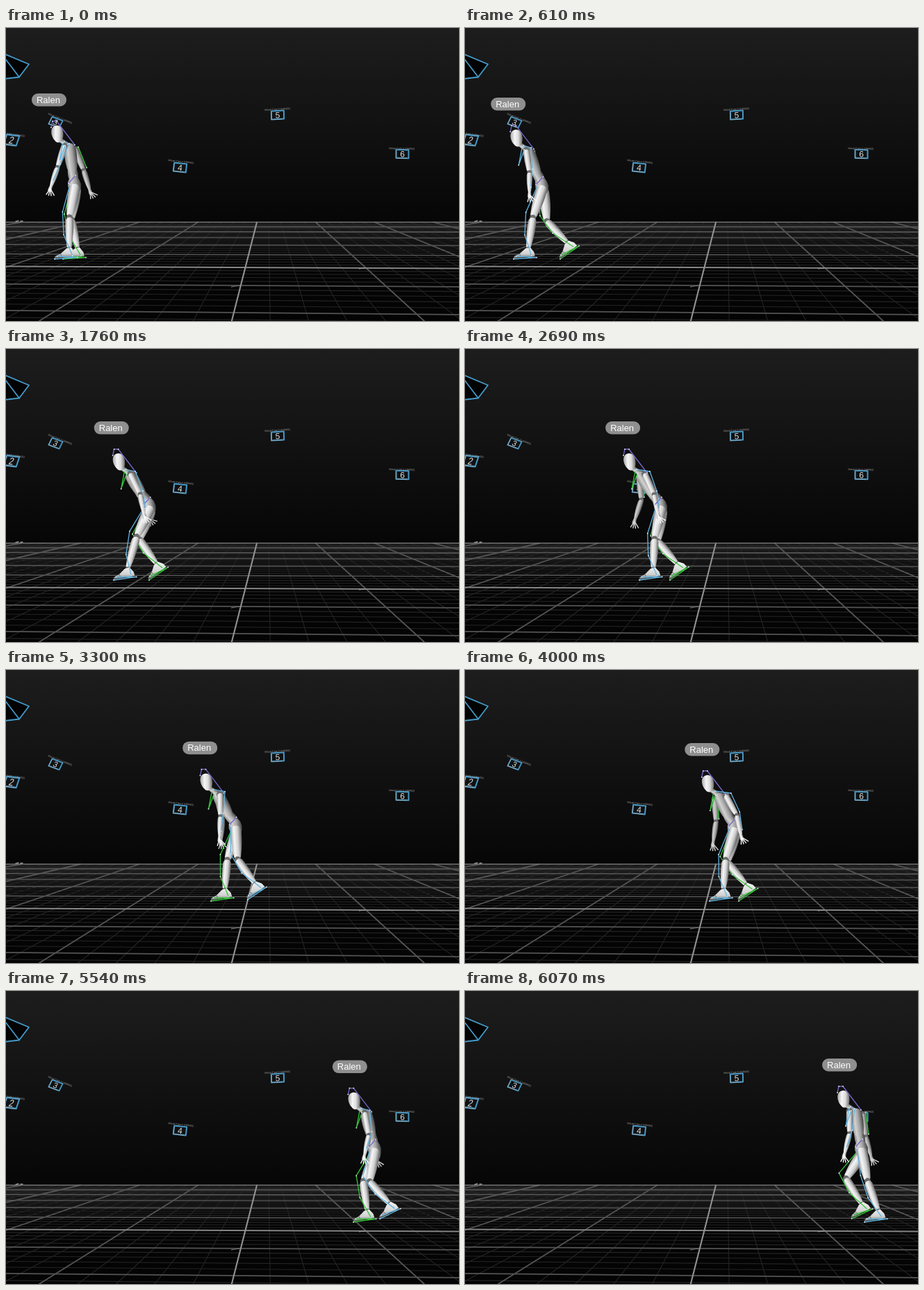
Animation of 652x421 px, one loop 6.15 s. Source, as an HTML page with a canvas:

```html
<!DOCTYPE html>
<html lang="en">
<head>
<meta charset="utf-8">
<title>Motion capture walk</title>
<style>
html, body { margin: 0; width: 100%; height: 100%; overflow: hidden; background: #000; }
canvas { display: block; }
</style>
</head>
<body>
<canvas id="stage" width="652" height="421"></canvas>
<script>
const W = 652, H = 421, LOOP = 6150, FRAMES = 80, STEP = LOOP / FRAMES;
const HORIZON = 279, GROUND = 332;
const BLUE = '#62b4e0', GREEN = '#35c63a', PURPLE = '#7768c8';
const FONT = '"Liberation Sans", Arial, sans-serif';
const ctx = document.getElementById('stage').getContext('2d');

// time, hip x/y, head x/y, shoulder spread, near upper/fore arm, far upper/fore arm (degrees)
const POSES = [
  [0, 98, 227, 74, 152, 16, -18, -19, 22, 17],
  [610, 110, 229, 74, 158, 8, 8, 0, 14, 6],
  [1760, 205, 228, 162, 162, 3, 26, 11, 20, 25],
  [2690, 281, 228, 237, 162, -8, 24, 12, 5, -18],
  [4000, 387, 229, 350, 163, -16, 29, 12, 3, -8],
  [5000, 487, 229, 455, 160, -6, 20, -9, 12, 5],
  [6070, 570, 228, 545, 155, 19, 0, -14, 8, 15]
];

// Each step: lift-off time, toe contact time, new toe x
const NEAR_FOOT = { start: 70, steps: [[750, 1220, 155], [1850, 2330, 251],
  [2850, 3370, 352], [4080, 4620, 460], [5180, 5750, 575]] };
const FAR_FOOT = { start: 82, steps: [[60, 600, 137], [1280, 1740, 206],
  [2380, 2680, 295], [3450, 3960, 394], [4660, 4960, 500], [5850, 6230, 590]] };

// digit, center, box axes, start of the tag and its slope
const CAMERAS = [
  ['2', 8, 161, 19, 2.5, -5, 15, -10, 151, .15],
  ['3', 71.5, 135.5, 16, 6, -5.5, 11, 60, 124, .4],
  ['4', 250.5, 200.5, 19, 2, -1.5, 13, 233, 191, .11],
  ['5', 391, 125, 19, -1, .3, 13, 372, 119, -.06],
  ['6', 570.5, 181, 19, .3, 0, 13, 551, 174, .02]
];

const add = (p, x, y) => ({ x: p.x + x, y: p.y + y });
const mix = (a, b, u) => ({ x: a.x + (b.x - a.x) * u, y: a.y + (b.y - a.y) * u });
const clamp = u => Math.max(0, Math.min(1, u));
const smooth = u => u * u * (3 - 2 * u);
const polar = (p, degrees, length) => {
  const a = degrees * Math.PI / 180;
  return add(p, Math.sin(a) * length, Math.cos(a) * length);
};

function trace(points) {
  ctx.beginPath();
  for (const p of points) ctx.lineTo(p.x, p.y);
}

function stroke(points, color, width) {
  trace(points);
  ctx.strokeStyle = color;
  ctx.lineWidth = width;
  ctx.stroke();
}

function fill(points, color) {
  trace(points);
  ctx.fillStyle = color;
  ctx.fill();
}

function markers(points, color) {
  stroke(points, color, 1.3);
  ctx.fillStyle = '#dfe8f2';
  for (const p of points) ctx.fillRect(p.x - .8, p.y - .8, 1.6, 1.6);
}

// ---------- scene ----------
function drawFloor() {
  ctx.save();
  ctx.beginPath();
  ctx.rect(0, HORIZON - 1, W, H);
  ctx.clip();
  ctx.fillStyle = '#040404';
  ctx.fillRect(0, HORIZON, W, H);

  const vanishY = 216.5;
  const acrossX = (k, y) => 377 + (y - vanishY) * (-.255 + 1.355 * k);
  const column = (k, color, width) =>
    stroke([HORIZON, H].map(y => ({ x: acrossX(k, y), y })), color, width);
  const row = (k, color, width) => {
    const y = vanishY + 1 / (.00784 + .00132 * k);
    const tilt = (y - HORIZON) * .023;
    stroke([{ x: 0, y: y - tilt }, { x: W, y: y + tilt }], color, width);
  };

  for (let i = -35; i <= 35; i++) if (i % 5) column(i / 5, '#242424', 1.1);
  for (let i = -12; i < 30; i++) if (i % 5) row(i / 5, '#242424', 1.1);
  for (let k = -7; k <= 7; k++) if (k) column(k, '#545454', 1.8);
  for (let k = -2; k < 6; k++) if (k) row(k, '#545454', 1.7);
  row(0, '#858585', 2);
  column(0, '#929292', 2.1);
  stroke([{ x: 0, y: HORIZON }, { x: W, y: HORIZON }], '#767676', 1.5);
  stroke([{ x: 324, y: 372 }, { x: 336, y: 370 }], '#777', 1);
  stroke([{ x: 508, y: 346 }, { x: 517, y: 345 }], '#999', 1);
  ctx.restore();
  stroke([{ x: 14, y: 278 }, { x: 18, y: 277 }], '#999', 1.3);
  stroke([{ x: 21, y: 277.5 }, { x: 24, y: 277.5 }], '#999', 1.3);
}

function drawCamera([digit, x, y, ax, ay, bx, by, tagX, tagY, slope]) {
  ctx.save();
  ctx.transform(ax / 19, ay / 19, bx / 13, by / 13, x, y);
  ctx.fillStyle = '#101214';
  ctx.fillRect(-9, -6, 18, 12);
  ctx.strokeStyle = '#4798c6';
  ctx.lineWidth = 2;
  ctx.strokeRect(-9, -6, 18, 12);
  stroke([{ x: -9, y: -4 }, { x: -9, y: 6 }, { x: 6, y: 6 }], '#86a2b0', 1.1);
  ctx.fillStyle = '#e0e0e0';
  ctx.font = '12px ' + FONT;
  ctx.textAlign = 'center';
  ctx.fillText(digit, 0, 4.3);
  ctx.restore();

  ctx.save();
  ctx.translate(tagX, tagY);
  ctx.rotate(Math.atan(slope));
  ctx.fillStyle = '#a8a8a8';
  ctx.font = '3.6px ' + FONT;
  ctx.fillText(`Virtual Cam ${digit} (168402)`, 0, 0);
  ctx.restore();
}

function drawScene() {
  const sky = ctx.createLinearGradient(0, 0, 0, HORIZON);
  sky.addColorStop(0, '#1d1d1d');
  sky.addColorStop(1, '#060606');
  ctx.fillStyle = sky;
  ctx.fillRect(0, 0, W, HORIZON);
  drawFloor();
  const cone = [{ x: -2, y: 37.5 }, { x: 33, y: 52 }, { x: 19, y: 70.5 }, { x: -2, y: 73 }];
  fill(cone, '#030303');
  stroke(cone, '#459ac8', 1.8);
  stroke([{ x: -2, y: 43 }, cone[2]], '#459ac8', 1.8);
  CAMERAS.forEach(drawCamera);
}

// ---------- motion ----------
function poseAt(t) {
  let i = 0;
  while (i < POSES.length - 2 && t >= POSES[i + 1][0]) i++;
  const a = POSES[i], b = POSES[i + 1];
  const before = POSES[Math.max(0, i - 1)], after = POSES[Math.min(POSES.length - 1, i + 2)];
  const span = b[0] - a[0], u = clamp((t - a[0]) / span);
  const [, hipX, hipY, headX, headY, spread, nearUpper, nearFore, farUpper, farFore] = a.map((v, c) => {
    const slopeA = (b[c] - before[c]) / (b[0] - before[0]) * span;
    const slopeB = (after[c] - v) / (after[0] - a[0]) * span;
    return v + (b[c] - v) * smooth(u) + slopeA * u * (1 - u) ** 2 - slopeB * u * u * (1 - u);
  });
  // The walking poses lie one stride apart; arms swing through in between.
  const swing = i >= 1 && i <= 4 ? Math.sin(Math.PI * u) ** 2 : 0;
  return {
    hip: { x: hipX, y: hipY - 2 * swing },
    head: { x: headX, y: headY - 2 * swing },
    spread: spread + 10 * swing,
    near: [nearUpper - 26 * swing, nearFore - 16 * swing],
    far: [farUpper + 10 * swing, farFore + 14 * swing]
  };
}

function footAt({ start, steps }, t) {
  let x = start, pitch = 4, lift = 0;
  for (const [from, to, target] of steps) {
    if (t < from) break;
    const u = clamp((t - from) / (to - from));
    const settle = clamp((t - to) / 260);
    x += (target - x) * smooth(u);
    lift = 5 * Math.sin(Math.PI * u);
    pitch = 8 + 27 * smooth(u) * (1 - smooth(settle));
  }
  const a = pitch * Math.PI / 180, c = Math.cos(a), s = Math.sin(a);
  const toe = { x, y: GROUND - lift };
  const at = (along, up) => add(toe, along * c - up * s, -along * s - up * c);
  return { at, toe, heel: at(33, 0), ankle: at(22, 13) };
}

function kneeFor(hip, ankle) {
  const thigh = 45, shin = 43;
  const dx = ankle.x - hip.x, dy = ankle.y - hip.y;
  const d = Math.min(Math.hypot(dx, dy), thigh + shin - .3);
  const bend = Math.acos((thigh * thigh + d * d - shin * shin) / (2 * thigh * d));
  const a = Math.atan2(dy, dx) + bend;
  return add(hip, Math.cos(a) * thigh, Math.sin(a) * thigh);
}

// ---------- mannequin ----------
const BRIGHT = ['#555', '#cfcfcf', '#f6f6f6', '#999'];
const SHADED = ['#3a3a3a', '#a0a0a0', '#d2d2d2', '#808080'];

function limb(a, b, r1, r2, tones = BRIGHT) {
  const length = Math.hypot(b.x - a.x, b.y - a.y);
  const r = Math.max(r1, r2) * 1.1;
  const shade = ctx.createLinearGradient(0, -r, 0, r);
  tones.forEach((color, i) => shade.addColorStop([0, .36, .68, 1][i], color));
  ctx.save();
  ctx.translate(a.x, a.y);
  ctx.rotate(Math.atan2(b.y - a.y, b.x - a.x));
  ctx.beginPath();
  ctx.arc(0, 0, r1, Math.PI / 2, -Math.PI / 2);
  ctx.quadraticCurveTo(length * .45, -r1 * 1.15, length, -r2);
  ctx.arc(length, 0, r2, -Math.PI / 2, Math.PI / 2);
  ctx.quadraticCurveTo(length * .45, r1 * 1.15, 0, r1);
  ctx.fillStyle = shade;
  ctx.fill();
  ctx.restore();
}

function joint(p, r) {
  ctx.beginPath();
  ctx.arc(p.x, p.y, r, 0, 7);
  ctx.fillStyle = '#6c6c6c';
  ctx.fill();
}

function drawArm(shoulder, [upper, fore], tones) {
  const elbow = polar(shoulder, upper, 32), wrist = polar(elbow, fore, 27);
  joint(shoulder, 5);
  limb(polar(shoulder, upper, 3), polar(shoulder, upper, 27), 4.6, 3.6, tones);
  joint(elbow, 3.4);
  limb(polar(elbow, fore, 4), wrist, 3.9, 2.2, tones);
  limb(polar(wrist, fore, 2), polar(wrist, fore, 7), 2.2, 2.8, tones);
  for (const angle of [-10, 4, 18, 34]) {
    stroke([polar(wrist, fore, 5), polar(wrist, fore + angle, 15)], tones[2], 1.4);
  }
  return { elbow, wrist };
}

function drawLeg(hip, foot, color) {
  const { ankle, at } = foot, knee = kneeFor(hip, ankle);
  limb(mix(hip, knee, .08), mix(hip, knee, .88), 7.6, 5.2);
  joint(knee, 4.6);
  limb(mix(knee, ankle, .12), mix(knee, ankle, .9), 5.8, 3.6);
  joint(ankle, 3.2);
  const shade = ctx.createLinearGradient(0, ankle.y - 4, 0, foot.toe.y);
  shade.addColorStop(0, '#f4f4f4');
  shade.addColorStop(.6, '#d0d0d0');
  shade.addColorStop(1, '#555');
  fill([at(0, 1), at(1, 4), at(9, 7), at(18, 14), at(25, 15), at(30, 8), at(31, 2)], shade);
  stroke([at(9, 7), at(11, 1)], '#666', 1);

  markers([add(hip, -7, -3), add(knee, -10, -8), add(mix(knee, ankle, .55), -8, 0), at(26, 3)], color);
  markers([foot.toe, foot.heel, at(4, 4)], color);
}

function drawHead(head, lean) {
  ctx.save();
  ctx.translate(head.x, head.y);
  ctx.rotate(-.08 - lean * .003);
  ctx.beginPath();
  ctx.moveTo(0, -12);
  ctx.bezierCurveTo(10, -12, 10, 2, 6, 9);
  ctx.bezierCurveTo(4, 14, -3, 14, -5, 9);
  ctx.bezierCurveTo(-10, 2, -10, -12, 0, -12);
  const shade = ctx.createLinearGradient(-8, 0, 9, 3);
  shade.addColorStop(0, '#b5b5b5');
  shade.addColorStop(.3, '#f6f6f6');
  shade.addColorStop(.6, '#dcdcdc');
  shade.addColorStop(1, '#5a5a5a');
  ctx.fillStyle = shade;
  ctx.fill();
  ctx.restore();
}

function drawLabel(head) {
  const x = head.x - 38 + head.x * .013, y = head.y - 58;
  ctx.beginPath();
  ctx.roundRect(x, y, 50, 18.5, 9);
  ctx.fillStyle = '#8f8f8f';
  ctx.fill();
  ctx.fillStyle = '#fff';
  ctx.font = '13px ' + FONT;
  ctx.fillText('Ralen', x + 7, y + 13.5);
}

function drawFigure(t) {
  const { hip, head, spread, near, far } = poseAt(t);
  const chest = add(head, 18, 20);
  const shoulder = add(chest, -spread / 2, -2);
  const farShoulder = add(chest, spread / 2, 3);

  const farArm = drawArm(farShoulder, far, SHADED);
  markers([add(farShoulder, 4, -4), add(farArm.elbow, 4, -4)], GREEN);
  drawLeg(add(hip, 3, 4), footAt(FAR_FOOT, t), GREEN);

  limb(add(head, 3, 8), mix(head, chest, .85), 3, 4, SHADED);
  limb(mix(chest, hip, .6), add(hip, 0, -8), 7, 6.5, SHADED);
  limb(add(chest, 0, 2), mix(chest, hip, .5), 8.5, 7.5, SHADED);
  limb(add(hip, 0, -4), add(hip, 1, 2), 9, 9, SHADED);

  drawLeg(add(hip, 1, 1), footAt(NEAR_FOOT, t), BLUE);
  drawHead(head, hip.x - head.x);
  const arm = drawArm(shoulder, near, BRIGHT);

  markers([add(hip, -8, -4), add(hip, 2, -15)], PURPLE);
  markers([add(head, -9, -9), add(head, -7, -18), add(head, -1, -18), add(chest, 7, -4)], PURPLE);
  markers([add(head, 8, 13), add(head, 3, 39), add(head, 11, 17)], spread > 7 ? BLUE : GREEN);
  markers([add(head, 10, 11), add(shoulder, 7, -4), add(arm.elbow, 4, -5), add(arm.wrist, 2, -6)], BLUE);
  drawLabel(head);
}

function draw(t) {
  // Pictures start on whole hundredths of a second.
  let k = Math.floor(t / STEP) + 1;
  if (Math.floor(k * STEP / 10) * 10 > t) k--;
  drawScene();
  drawFigure(k % FRAMES * STEP);
}

const began = performance.now();
ctx.lineJoin = ctx.lineCap = 'round';
requestAnimationFrame(function loop() {
  draw((performance.now() - began) % LOOP);
  requestAnimationFrame(loop);
});
</script>
</body>
</html>
```
